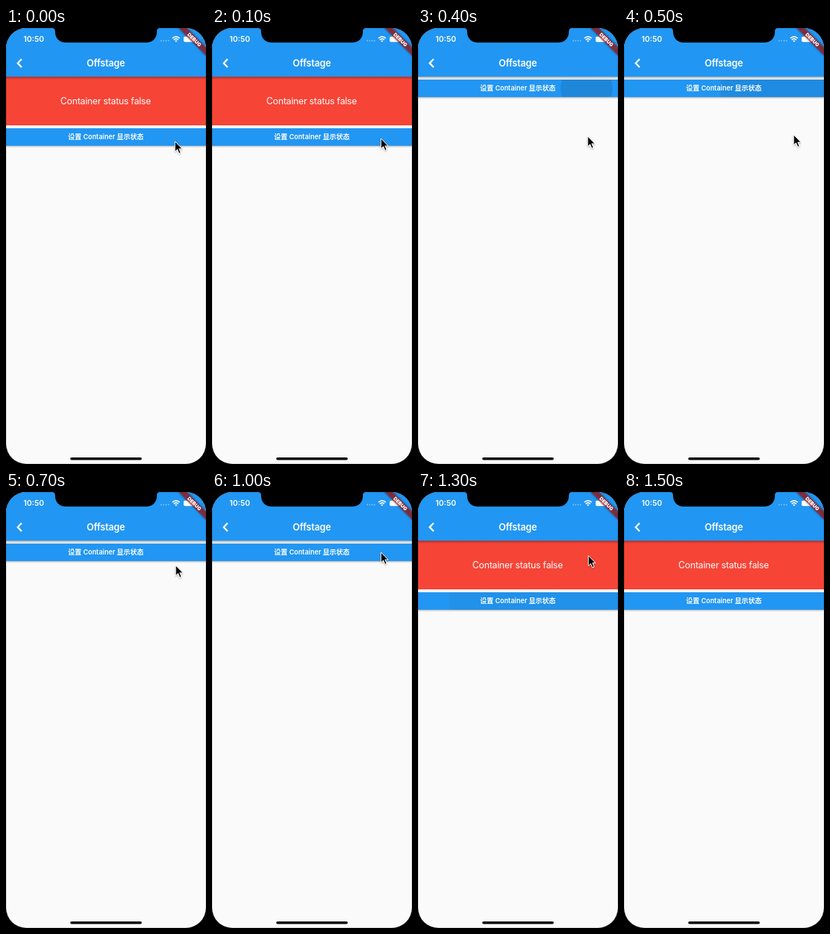
An HTML page for the animation above (1.6 s loop, 277 by 600 pixels).

```html
<!DOCTYPE html>
<html lang="en">
<head>
<meta charset="utf-8">
<title>Offstage demo</title>
<style>
  html, body { margin: 0; width: 100%; height: 100%; overflow: hidden; background: #000; }
  svg { display: block; width: 277px; height: 600px; }
  text { fill: #fff; font-family: Inter, "Noto Sans CJK SC", "Noto Sans CJK", sans-serif; text-anchor: middle; }
  .title { font-size: 12.9px; font-weight: 600; letter-spacing: -.1px; }
  .label { font-size: 12.6px; letter-spacing: -.2px; }
  .action { font-size: 9.3px; font-weight: 600; }
  .clock { font-size: 10.7px; font-weight: 600; }
  .banner { font-size: 6.8px; font-weight: 900; }
</style>
</head>
<body>
<svg viewBox="0 0 277 600">
  <defs>
    <clipPath id="screen"><rect width="277" height="600" rx="28"/></clipPath>
    <clipPath id="face"><rect width="277" height="24"/></clipPath>
    <linearGradient id="shade" x2="0" y2="1">
      <stop stop-opacity=".28"/>
      <stop offset="1" stop-opacity="0"/>
    </linearGradient>
    <filter id="lift" x="-5%" y="-30%" width="110%" height="180%">
      <feDropShadow dx="0" dy="1" stdDeviation=".9" flood-opacity=".35"/>
    </filter>
    <filter id="soft" x="-30%" y="-30%" width="160%" height="160%">
      <feDropShadow dx="0" dy="1" stdDeviation=".8" flood-opacity=".35"/>
    </filter>
    <filter id="glow" x="-20%" y="-100%" width="140%" height="300%">
      <feGaussianBlur stdDeviation="1.6"/>
    </filter>
  </defs>

  <g clip-path="url(#screen)">
    <rect width="277" height="600" fill="#fafafa"/>

    <g id="panel">
      <rect y="67" width="277" height="67" fill="#f64436"/>
      <text class="label" x="138" y="105">Container status false</text>
    </g>

    <g id="button">
      <rect width="277" height="24" fill="#2196f3" filter="url(#lift)"/>
      <g clip-path="url(#face)"><circle id="ripple" cx="233.5" cy="12"/></g>
      <text class="action" x="138.3" y="15.4">设置 Container 显示状态</text>
    </g>

    <rect y="67" width="277" height="4" fill="url(#shade)"/>
    <rect width="277" height="67" fill="#2196f3"/>
    <path d="M21.6 42.8 16.2 48.4 21.6 54" fill="none" stroke="#fff" stroke-width="2.3"/>
    <text class="title" x="138.3" y="52.8">Offstage</text>

    <text class="clock" x="38.5" y="19.2">10:50</text>
    <g fill="#fff" fill-opacity=".45">
      <circle cx="215" cy="17.5" r=".9"/><circle cx="218.4" cy="17.5" r=".9"/>
      <circle cx="221.8" cy="17.5" r=".9"/><circle cx="225.2" cy="17.5" r=".9"/>
    </g>
    <g fill="none" stroke="#fff" stroke-width="1.6">
      <path d="M230.4 14.2Q235.5 9.6 240.6 14.2"/>
      <path d="M232.4 16.3Q235.5 13.4 238.6 16.3"/>
    </g>
    <path d="M233.8 17.6Q235.5 16.2 237.2 17.6L235.5 19.4Z" fill="#fff"/>
    <rect x="246" y="11.7" width="16" height="7.6" rx="2" fill="#fff"/>

    <g transform="translate(277 0) rotate(45)">
      <rect x="-27" y="18.7" width="54" height="8.1" opacity=".5" filter="url(#glow)"/>
      <rect x="-27" y="18.7" width="54" height="8.1" fill="#b71c1c" fill-opacity=".63"/>
      <text class="banner" x="0" y="25.2">DEBUG</text>
    </g>

    <rect x="89" y="591" width="99" height="3.6" rx="1.8"/>
    <path d="M63 0C67 0 68 2 68 5C68 14 74 20 83 20H194C203 20 209 14 209 5C209 2 210 0 214 0Z"/>
    <rect width="277" height="600" rx="28" fill="none" stroke="#000" stroke-opacity=".25"/>
  </g>

  <path id="cursor" d="M0 0V14.2L3.3 11.1 5.7 16.6 8 15.6 5.7 10.2H10Z"
        stroke="#fff" stroke-width="1" filter="url(#soft)"/>
</svg>
<script>
  const LOOP = 1600, STEP = 100;
  const HIDE = 4, SHOW = 11, GONE = 15;
  const get = id => document.getElementById(id);
  const [panel, button, ripple, cursor] = ['panel', 'button', 'ripple', 'cursor'].map(get);

  // [step, x, y] of the pointer tip
  const path = [
    [0, 234, 156], [2, 234, 148], [3, 234, 148], [4, 235, 149], [5, 235, 147],
    [7, 235, 101], [9, 234, 83], [12, 234, 83], [14, 238, 92]
  ];
  // [radius, opacity] per step after a tap
  const splash = [[36, .1], [100, .075], [190, .035]];

  function pointAt(step) {
    const i = path.findIndex(p => p[0] >= step);
    if (i < 1) return path[i < 0 ? path.length - 1 : 0].slice(1);
    const [a, b] = [path[i - 1], path[i]];
    const k = (step - a[0]) / (b[0] - a[0]);
    return [1, 2].map(n => a[n] + (b[n] - a[n]) * k);
  }

  function draw(step) {
    const hidden = step >= HIDE && step < SHOW;
    panel.style.display = hidden ? 'none' : '';
    button.setAttribute('transform', `translate(0 ${hidden ? 71 : 138})`);

    const age = step - (step < SHOW ? HIDE : SHOW);
    const [r, alpha] = splash[age] || [0, 0];
    ripple.setAttribute('r', step >= SHOW && age === 0 ? 44 : r);
    ripple.setAttribute('fill-opacity', alpha);

    cursor.style.display = step < GONE ? '' : 'none';
    cursor.setAttribute('transform', `translate(${pointAt(step)})`);
  }

  const start = performance.now();
  function tick() {
    draw(Math.floor((performance.now() - start) % LOOP / STEP));
    requestAnimationFrame(tick);
  }
  tick();
</script>
</body>
</html>
```
